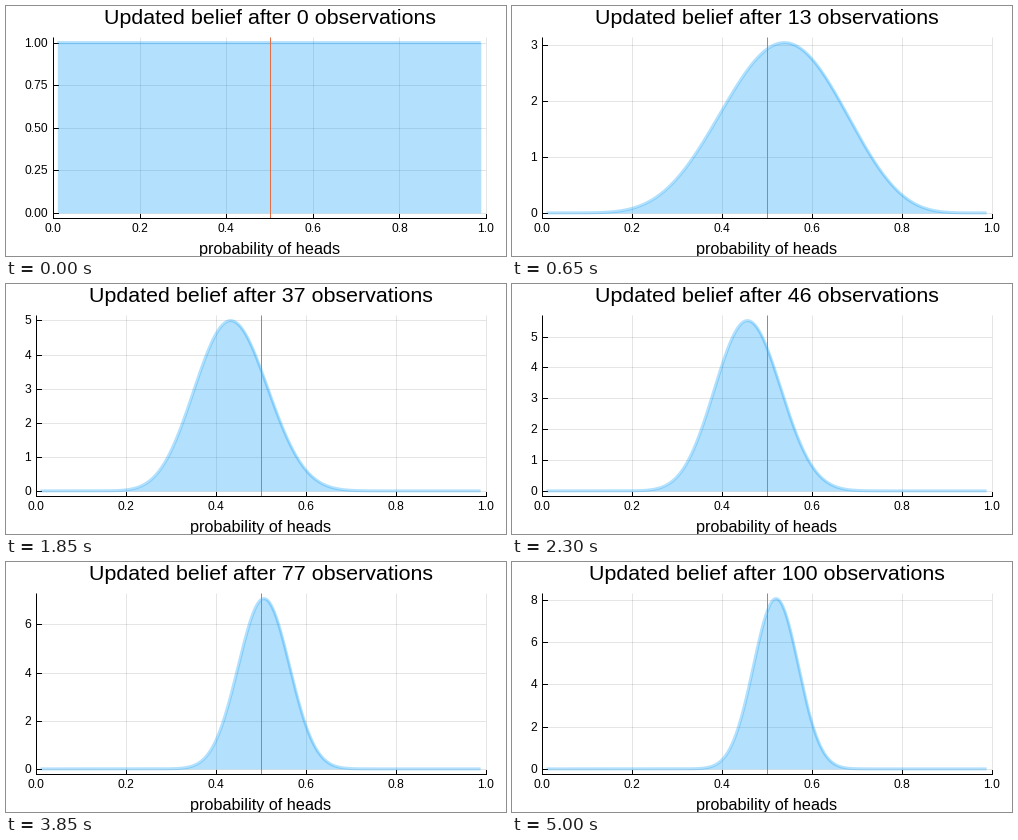
A matplotlib script for the animation above (5050 ms loop, 500 by 250 pixels).

```python
import math

import numpy as np
import matplotlib.pyplot as plt
from matplotlib.animation import FuncAnimation

W, H, DPI = 500, 250, 100
PX = 72 / DPI                       # points per pixel
RIGHT, TOP, BOTTOM = 480, 31.5, 212
BLUE, ORANGE = "#009afa", "#e36f47"

plt.rcParams["font.family"] = "Liberation Sans"
plt.rcParams["text.hinting"] = "force_autohint"

# Heads seen after a given number of tosses, filled in evenly between.
TOSSES = [0, 13, 28, 46, 58, 77, 100]
HEADS = [0, 7, 11, 21, 26, 39, 52]

fig = plt.figure(figsize=(W / DPI, H / DPI), dpi=DPI, facecolor="white")
ax = fig.add_axes([0, 0, 1, 1])


def beta_pdf(x, heads, tails):
    log_norm = (math.lgamma(heads + tails + 2)
                - math.lgamma(heads + 1) - math.lgamma(tails + 1))
    return np.exp(log_norm + heads * np.log(x) + tails * np.log(1 - x))


def y_ticks(peak):
    """Tick values with their number of decimals."""
    top = peak * 1.03
    if top < 1.2:
        step, digits = 0.25, 2
    elif top < 3:
        step, digits = 0.5, 1
    elif top < 7:
        step, digits = 1, 0
    else:
        step, digits = 2, 0
    return np.arange(0, top, step), digits


def rule(x0, y0, x1, y1, color="black", alpha=1, z=1):
    ax.plot([x0, x1], [y0, y1], color=color, alpha=alpha, lw=PX,
            solid_capstyle="butt", snap=False, zorder=z)


def hline(y, x0, x1, **style):
    y = round(y) + 0.5
    rule(x0, y, x1, y, **style)


def vline(x, y0, y1, **style):
    x = round(x) + 0.5
    rule(x, y0, x, y1, **style)


def label(x, y, text, size, ha="center"):
    ax.text(x, y, text, fontsize=size * PX, ha=ha, va="baseline",
            color="black", zorder=6)


def draw(n):
    ax.clear()
    ax.set_xlim(0, W)
    ax.set_ylim(H, 0)
    ax.axis("off")

    heads = round(float(np.interp(n, TOSSES, HEADS)))
    p = np.linspace(0.01, 0.988, 400)
    density = beta_pdf(p, heads, n - heads)
    peak = density.max()
    ticks, digits = y_ticks(peak)
    left = {0: 30, 1: 40, 2: 47}[digits]
    middle = (left + RIGHT) / 2

    def px(v):
        return left + v * (RIGHT - left)

    def py(v):
        return BOTTOM - (v / peak + 0.03) / 1.06 * (BOTTOM - TOP)

    for v in np.arange(6) / 5:
        x = px(v)
        vline(x, TOP, BOTTOM, alpha=0.1, z=0)
        vline(x, BOTTOM - 4, BOTTOM)
        label(x, 226, f"{v:.1f}", 12)
    for v in ticks:
        y = py(v)
        hline(y, left, RIGHT, alpha=0.1, z=0)
        hline(y, left, left + 6)
        label(left - 5, round(y + 4), f"{v:.{digits}f}", 12, "right")
    vline(left, TOP, BOTTOM + 1)
    hline(BOTTOM, left, RIGHT + 1)

    xs, ys = px(p), py(density)
    ax.fill_between(xs, ys, py(0), color=BLUE, alpha=0.3, lw=0,
                    snap=False, zorder=3)
    ax.plot(xs, ys, color=BLUE, alpha=0.3, lw=3 * PX,
            solid_capstyle="butt", snap=False, zorder=4)
    vline(middle, TOP, BOTTOM, color=ORANGE, z=5)

    label(middle, 18, f"Updated belief after {n} observations", 21.4)
    label(middle, 248, "probability of heads", 16.3)
    return []


anim = FuncAnimation(fig, draw, frames=101, interval=50, repeat=True)
plt.show()
```
